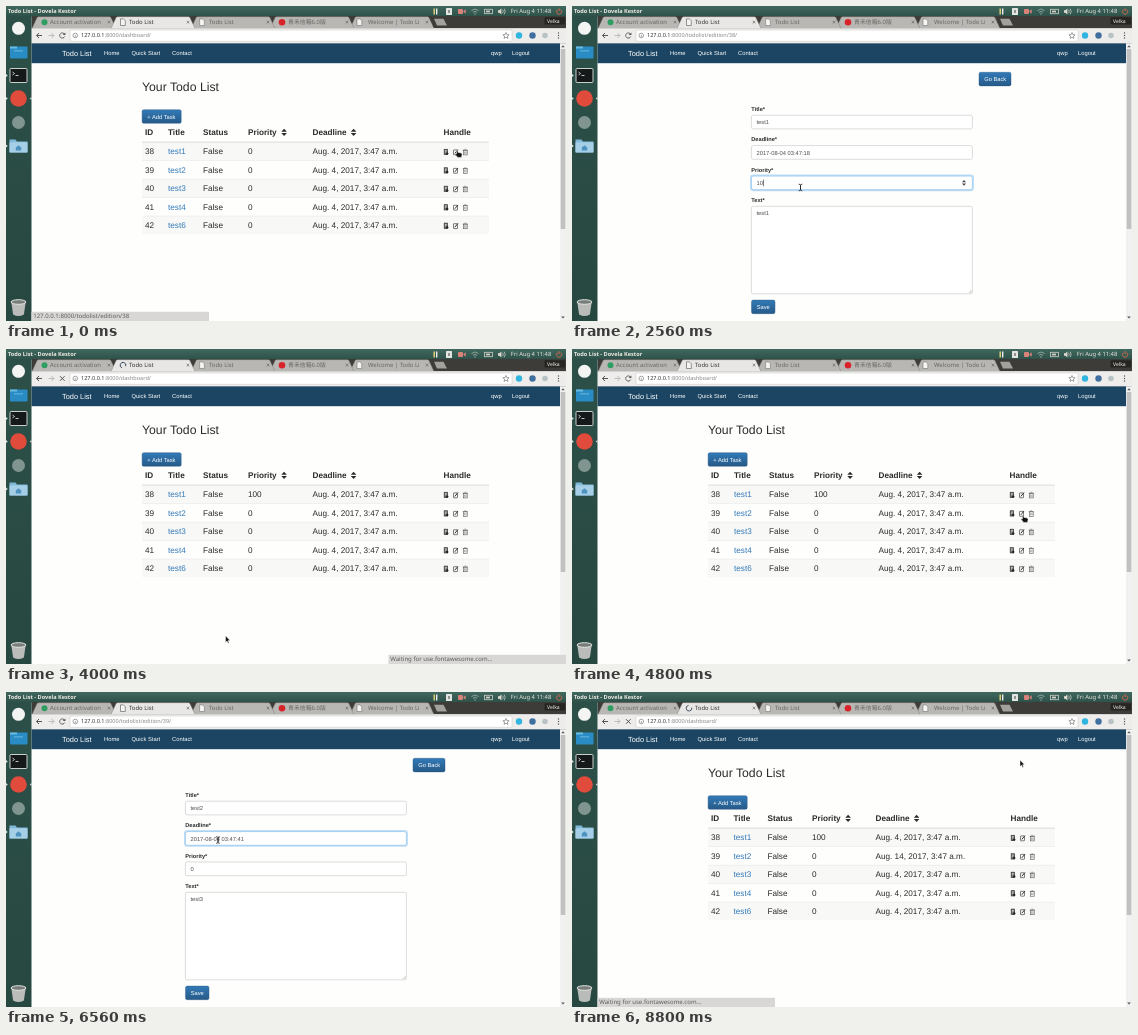
An HTML page that plays this animation: 560 px wide and 315 px high, repeating every 8960 ms.

```html
<!DOCTYPE html>
<html lang="en">
<head>
<meta charset="utf-8">
<title>Todo List</title>
<style>
html, body { margin: 0; width: 100%; height: 100%; overflow: hidden; background: #fff; }
svg { display: block; width: 100%; height: 100%; font-family: "Liberation Sans", Arial, sans-serif; }
text { white-space: pre; text-rendering: geometricPrecision; }
.ui { font-family: "Noto Sans", "Noto Sans CJK SC", "Noto Sans CJK", sans-serif; }
</style>
</head>
<body>
<svg viewBox="0 0 560 315">
  <defs>
    <linearGradient id="button" x2="0" y2="1"><stop stop-color="#337ab7"/><stop offset="1" stop-color="#265a88"/></linearGradient>
    <linearGradient id="panel" x2="0" y2="1"><stop stop-color="#41685f"/><stop offset="1" stop-color="#2c5149"/></linearGradient>
    <linearGradient id="dock" x2="0" y2="1"><stop stop-color="#2c5048"/><stop offset="1" stop-color="#274840"/></linearGradient>
  </defs>
  <g id="desktop"></g>
  <g id="scene"></g>
</svg>
<script>
const LOOP = 8960, STEP = 160;

const rect = (x, y, w, h, fill, extra = '') =>
  `<rect x="${x}" y="${y}" width="${w}" height="${h}" fill="${fill}" ${extra}/>`;
const dot = (x, y, r, fill) => `<circle cx="${x}" cy="${y}" r="${r}" fill="${fill}"/>`;
const shape = (d, fill, extra = '') => `<path d="${d}" fill="${fill}" ${extra}/>`;
const line = (d, stroke, width = 1) => shape(d, 'none', `stroke="${stroke}" stroke-width="${width}"`);
const text = (x, y, s, size, fill = '#2b2b2b', extra = '') =>
  `<text x="${x}" y="${y}" font-size="${size}" fill="${fill}" ${extra}>${s}</text>`;
const ui = (x, y, s, size, fill, extra = '') => text(x, y, s, size, fill, 'class="ui" ' + extra);
const bold = (x, y, s, size) => text(x, y, s, size, '#2b2b2b', 'font-weight="bold"');
const at = (x, y, s) => `<g transform="translate(${x} ${y})">${s}</g>`;

// Desktop, browser frame and navigation bar: never change

const page = (x, y, ink = '#555') =>
  shape(`M${x} ${y}h3l1.8 1.8v4.8h-4.8z`, '#f4f4f3', `stroke="${ink}" stroke-width=".6"`);
const closeMark = x => line(`M${x - 1.3} 14.8l2.6 2.6m0-2.6l-2.6 2.6`, '#666', .7);

function tab(x, title, icon, active) {
  return shape(`M${x - 3} 22.5l5-10.8q.5-1 1.5-1h71q1 0 1.5 1l5 10.8z`, active ? '#e9e7e5' : '#b9b7b3',
      'stroke="#77756f" stroke-width=".4"') +
    icon + ui(x + 15, 18.3, title, 5.9, active ? '#333' : '#666') + closeMark(x + 74);
}

function tray() {
  return rect(427.5, 2.5, 1.4, 6, '#e9d77a') + rect(430, 2.5, 1.4, 6, '#eee') +
    rect(440, 2, 6, 7, '#e4e4e0', 'rx=".6"') + rect(442, 4, 2, 3, '#8a958f') +
    rect(452, 3, 5, 5, '#d8827a', 'rx="1"') + shape('M457.5 5l2.2-1.8v4.6l-2.2-1.8z', '#d8827a') +
    line('M465.5 4.5q3.5-3 7 0M467 6.3q2-1.7 4 0', '#8fa39a', 1) + dot(469, 8, .8, '#8fa39a') +
    rect(478.5, 3.3, 8, 4.4, 'none', 'stroke="#cfcdc5" stroke-width=".8"') + rect(480, 4.6, 4, 1.8, '#cfcdc5') +
    shape('M492 4.3h1.4l2-1.8v6l-2-1.8h-1.4z', '#dfdbd2') + line('M496.6 3.7q1.3 1.8 0 3.6M498.2 2.7q2 2.8 0 5.6', '#dfdbd2', .7) +
    ui(504.8, 7.4, 'Fri Aug 4 11:48', 5.8, '#e9e6df') +
    line('M551.5 3.6a2.6 2.6 0 1 0 3.2 0M553.1 2.2v3', '#dd6a4f', .9);
}

function dock() {
  const running = y => shape(`M0 ${y - 1.5}l1.8 1.5l-1.8 1.5z`, '#d5ddd8');
  return rect(0, 10, 25.5, 305, 'url(#dock)') +
    dot(12.5, 22.3, 6.5, '#f4f4f2') +
    rect(4, 40.5, 17.5, 12, '#2a8cc4', 'rx=".8"') + rect(4, 40.5, 7, 2, '#6bbbe0') + rect(8, 44.5, 9, .8, '#7cc3e6') +
    rect(4, 62.5, 17, 14, '#16191a', 'rx="1" stroke="#c9cfca" stroke-width="1"') + line('M6.5 66l2 1.5l-2 1.5M9.5 69.5h3', '#eee', .8) +
    dot(12.5, 92.5, 8.3, '#e04b3c') +
    dot(12.5, 116.5, 6.5, '#80958f') +
    shape('M3.5 133.5h6l1.5 2h10.5v11h-18z', '#7fb8d8') + rect(3.5, 136.3, 18, 10.2, '#a5cfe6', 'rx=".8"') +
    shape('M9.8 141.6l2.7-2.4l2.7 2.4v2.8h-5.4z', '#4d93bf') +
    running(69.5) + running(92.5) + running(140) + shape('M25.5 91l-1.8 1.5l1.8 1.5z', '#d5ddd8') +
    shape('M5.3 296l1.8 12.5q5.4 3 10.8 0l1.8-12.5z', '#b9bcb9') +
    '<ellipse cx="12.5" cy="296" rx="7.4" ry="2.3" fill="#777d79" stroke="#e6e7e5" stroke-width="1"/>';
}

function browser() {
  const doc = x => page(x, 12.9, '#777');
  return rect(0, 0, 560, 10.5, 'url(#panel)') +
    ui(2, 7.4, 'Todo List - Dovela Kestor', 5.6, '#efece5', 'font-weight="bold"') + tray() +
    rect(25.5, 10, 534.5, 12.5, '#3d3c38') +
    tab(347, 'Welcome | Todo Li', doc(351)) +
    tab(267, '青禾信箱6.0版', dot(276, 16.2, 3.3, '#d8232a')) +
    tab(188, 'Todo List', doc(193.6)) +
    tab(29, 'Account activation', dot(38.5, 16.2, 3, '#2f9e62')) +
    tab(108, 'Todo List', '', true) +
    shape('M428 12.8h9.5l3.5 6.8h-10z', '#a3a19c') +
    rect(538.5, 11.3, 20.5, 7.2, '#262522', 'rx="1"') + ui(541, 16.8, 'Velka', 5.1, '#f4f4f4') +
    rect(25.5, 22.3, 534.5, 15, '#eeedeb') +
    rect(64, 24, 442, 11.3, '#fff', 'rx="1" stroke="#c6c4c0" stroke-width=".5"') +
    line('M36 29.5h-5.5m2.5-2.5l-2.5 2.5l2.5 2.5', '#555', 1) +
    line('M42.5 29.5h5.5m-2.5-2.5l2.5 2.5l-2.5 2.5', '#bbb', 1) +
    line('M71.6 29.5a2.3 2.3 0 1 0-4.6 0a2.3 2.3 0 1 0 4.6 0M69.3 29v2', '#666', .6) +
    shape('M500 26.5l.9 2.1l2.2.2l-1.7 1.4l.6 2.2l-2-1.2l-2 1.2l.6-2.2l-1.7-1.4l2.2-.2z', 'none', 'stroke="#666" stroke-width=".6"') +
    dot(513, 29.5, 3.2, '#2fb5df') + dot(526.5, 29.5, 3.2, '#3f6f9f') + dot(539, 29.5, 2.8, '#b9c3c6') +
    dot(552.5, 27, .7, '#555') + dot(552.5, 29.5, .7, '#555') + dot(552.5, 32, .7, '#555') +
    rect(25.5, 37, 528.5, 278, '#fefefd') + rect(554, 37, 6, 278, '#f1f1f1') + rect(554.7, 43, 4.6, 180, '#c1c1c1') +
    shape('M555.2 41.2l1.8-2l1.8 2zM555.2 310.5l1.8 2l1.8-2z', '#555') +
    rect(25.5, 37, 534.5, .5, '#b6b4b0') + rect(25.5, 37.4, 528.5, 19.8, '#1b4562') +
    text(56, 49.8, 'Todo List', 7.4, '#fff') +
    [[98, 'Home'], [125.5, 'Quick Start'], [166, 'Contact'], [485, 'qwp'], [506, 'Logout']]
      .map(([x, s]) => text(x, 49.3, s, 5.8, '#fff')).join('');
}

// Page contents

const button = (x, y, w, label) =>
  rect(x, y, w, 13.6, 'url(#button)', 'rx="1.6" stroke="#245580" stroke-width=".4"') + text(x + 5.2, y + 8.9, label, 5.75, '#fff');

const sortMark = x => shape(`M${x} 125.8l2.8-3l2.8 3zM${x} 127l2.8 3l2.8-3z`, '#2b2b2b');

const rowIcons =
  rect(.4, .3, 3.4, 5.3, '#777', 'stroke="#333" stroke-width=".7"') + line('M1.2 1.7h1.8M1.2 2.9h1.2', '#eee', .6) + dot(3.4, 4.6, 1.2, '#222') +
  rect(9.7, .9, 4, 4.9, 'none', 'rx=".4" stroke="#444" stroke-width=".7"') + line('M11 4.4l3.2-3.8', '#333', 1) +
  rect(19.6, 1.4, 3.8, 4.5, 'none', 'stroke="#555" stroke-width=".6"') + line('M18.9 1.1h5.2M20.6.3h1.8M20.9 2.5v2.4M22.2 2.5v2.4', '#555', .5);

function listPage({ priority, late }) {
  const cols = late ? [139, 161.5, 195.5, 240, 303.5, 438.5] : [139, 162, 197, 242, 306.5, 437.5];
  const size = 8.2;
  const heads = ['ID', 'Title', 'Status', 'Priority', 'Deadline', 'Handle'];
  let out = text(136, 85, 'Your Todo List', 12.25) + button(136.1, 103.7, 39.1, '+ Add Task') +
    heads.map((s, i) => bold(cols[i], 129.1, s, size)).join('') +
    sortMark(cols[3] + 33.3) + sortMark(cols[4] + 38.3);
  [1, 2, 3, 4, 6].forEach((n, i) => {
    const y = 136 + i * 18.45, base = y + 12.2;
    const day = late && i === 1 ? 14 : 4;
    const cells = [38 + i, 'test' + n, 'False', i ? 0 : priority, `Aug. ${day}, 2017, 3:47 a.m.`];
    out += rect(136, y, 347, 18.45, i % 2 ? '#fefefd' : '#f8f8f7') + rect(136, i ? y : y - .4, 347, i ? .5 : 1, i ? '#e3e3e3' : '#ddd') +
      cells.map((s, c) => text(cols[c], base, s, size, c === 1 ? '#337ab7' : '#2b2b2b')).join('') +
      at(cols[5] + .3, y + 7, rowIcons);
  });
  return out;
}

function formPage({ fields, focus, caret }) {
  const tops = [109.2, 139.6, 170, 200.3];
  return button(407, 66.3, 32, 'Go Back') + button(179.5, 294.1, 23.5, 'Save') +
    ['Title*', 'Deadline*', 'Priority*', 'Text*'].map((label, i) => {
      const y = tops[i], h = i === 3 ? 87.5 : 13.7, on = focus === i;
      return bold(179.3, y - 4.3, label, 5.65) +
        (on ? rect(178.6, y - .9, 222.8, h + 1.8, 'none', 'rx="2.5" stroke="#66afe9" stroke-opacity=".4" stroke-width="1.2"') : '') +
        rect(179.4, y, 221, h, '#fff', `rx="1.8" stroke="${on ? '#66afe9' : '#c4c4c4'}" stroke-width=".6"`) +
        text(184.5, y + 8.9, fields[i], 5.75, '#4c4c4c') +
        (on && i === 2 ? shape('M390 176.3l2-2.4l2 2.4zM390 177.4l2 2.4l2-2.4z', '#444') : '');
    }).join('') +
    line('M396.8 287l2.8-2.8M398.4 287l1.2-1.2', '#999', .5) +
    (caret ? rect(caret, tops[focus] + 3.6, .6, 6.6, '#222') : '');
}

function statusBubble(s, right) {
  const x = right ? 382.5 : 25.5;
  return rect(x, 305.8, 177.5, 9.2, '#d8d7d5') + ui(x + 1.7, 312.4, s, 6.05, '#5c5c5c');
}

const edge = 'stroke="#fff" stroke-width=".5" stroke-linejoin="round"';
const pointers = {
  arrow: shape('M0 0v6.6l1.5-1.4l1 2.3l1.1-.5l-1-2.2h2z', '#111', edge),
  hand: shape('M-1.6-2.8q.8-.7 1.4.1v2l3.2.7q1.2.3 1.1 1.4l-.6 3h-3.8l-2.6-3q.1-1 1.3-.4z', '#111', edge),
  beam: line('M-1.8-3.3q1.8 0 1.8 1v4.6q0 1-1.8 1M1.8-3.3q-1.8 0-1.8 1v4.6q0 1 1.8 1', '#222', .8)
};

// Timeline: each entry changes part of the state

const edit = n => '127.0.0.1:8000/todolist/edition/' + n;
const fonts = 'Waiting for use.fontawesome.com...', waiting = 'Waiting for 127.0.0.1...';
const first = priority => ['test1', '2017-08-04 03:47:18', priority, 'test1'];
const second = day => ['test2', `2017-08-${day} 03:47:41`, '0', 'test3'];

const timeline = [
  [0, { page: listPage, url: 'dashboard/', status: edit(38), busy: 0, priority: 0, late: false, focus: -1, caret: 0, right: false }],
  [320, { busy: 1, status: waiting }],
  [480, { url: 'todolist/edition/38/' }],
  [640, { page: formPage, fields: first('0'), busy: 2, status: fonts }],
  [800, { status: '' }],
  [1120, { busy: 0 }],
  [1440, { focus: 2 }],
  [1760, { caret: 187.9 }],
  [2080, { caret: 184.6 }],
  [2400, { fields: first('1'), caret: 187.9 }],
  [2560, { fields: first('10'), caret: 191.1 }],
  [2720, { fields: first('100'), caret: 194.3 }],
  [3360, { focus: -1, caret: 0, busy: 1 }],
  [3520, { url: 'dashboard/', status: 'Processing request...', right: true }],
  [3680, { status: waiting }],
  [3840, { page: listPage, priority: 100, busy: 2, status: fonts }],
  [4160, { status: '' }],
  [4320, { busy: 0, right: false }],
  [4960, { status: edit(39) }],
  [5120, { busy: 1, url: 'todolist/edition/39/', status: waiting }],
  [5280, { page: formPage, fields: second('04'), busy: 2, status: fonts }],
  [5600, { busy: 0 }],
  [5760, { status: '' }],
  [6400, { focus: 1 }],
  [7200, { caret: 210.7 }],
  [7520, { fields: second('14'), caret: 210.7 }],
  [8320, { busy: 1, url: 'dashboard/', focus: -1, caret: 0 }],
  [8640, { page: listPage, late: true, busy: 2, status: fonts }]
];

// Pointer stops: time, x, y, look from then on
const path = [
  [0, 452, 147, 'hand'], [640, 451.7, 144, 'arrow'], [960, 451.7, 144, 'arrow'], [1280, 222, 177, 'beam'],
  [1920, 222, 177, 'beam'], [2080, 223, 178.5, 'beam'], [2400, 228.5, 181.5, 'beam'], [2720, 228.5, 181.5, 'arrow'],
  [3200, 192.5, 300.5, 'hand'], [3840, 192.5, 300.5, 'arrow'], [4640, 452, 169, 'hand'], [5280, 452, 169, 'arrow'],
  [5600, 300, 156, 'arrow'], [6240, 212, 148, 'beam'], [7360, 212, 148, 'beam'], [7520, 220, 162, 'arrow'],
  [7680, 220, 162, 'arrow'], [8000, 192.5, 300.5, 'hand'], [8480, 192.5, 300.5, 'arrow'],
  [8800, 448, 68, 'arrow'], [LOOP, 448, 68, 'arrow']
];

function pointerAt(t) {
  const i = path.findIndex(p => p[0] > t);
  const [t0, x0, y0, look] = path[i - 1], [t1, x1, y1] = path[i];
  const k = (t - t0) / (t1 - t0), e = k * k * (3 - 2 * k);
  return at(x0 + (x1 - x0) * e, y0 + (y1 - y0) * e, pointers[look]);
}

function tabState({ busy, url }, t) {
  const spin = busy === 1 ? -t * .36 : t * .5;
  return (busy
    ? `<g transform="translate(117 16.2) rotate(${spin})">${line('M0-2.8a2.8 2.8 0 1 1-2.8 2.8', busy === 1 ? '#777' : '#3c4b5c', .9)}</g>` +
      line('M54 27.2l4.6 4.6m0-4.6l-4.6 4.6', '#555', 1)
    : page(114.5, 12.9) + line('M58.6 28.3a2.6 2.6 0 1 0 .1 2.2', '#555', .9) + shape('M59.4 26.4v2.7h-2.7z', '#555')) +
    ui(75, 31.4, `127.0.0.1<tspan fill="#888">:8000/${url}</tspan>`, 5.55, '#333');
}

function render(t) {
  const state = Object.assign({}, ...timeline.filter(([start]) => start <= t).map(entry => entry[1]));
  scene.innerHTML = tabState(state, t) + state.page(state) +
    (state.status ? statusBubble(state.status, state.right) : '') + pointerAt(t);
}

const scene = document.getElementById('scene');
document.getElementById('desktop').innerHTML = browser() + dock();

let shown = -1;
const began = performance.now();
function tick() {
  const t = Math.floor((performance.now() - began) % LOOP / STEP) * STEP;
  if (t !== shown) render(shown = t);
  requestAnimationFrame(tick);
}
tick();
</script>
</body>
</html>
```
